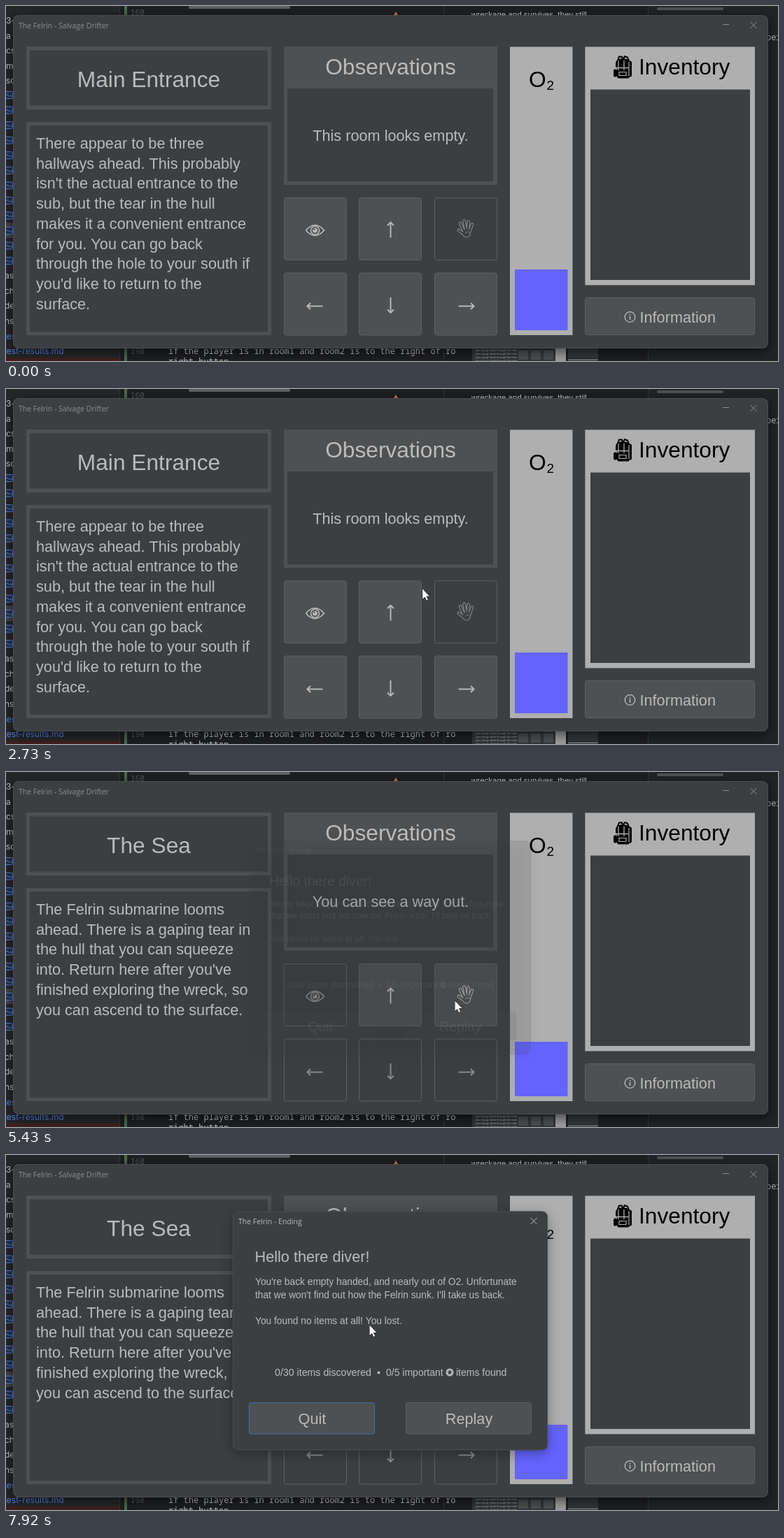
Write an HTML page with a canvas that moves like this. It is 1103 by 508 pixels and loops after 7.99 s.

```html
<!DOCTYPE html>
<html lang="en">
<head>
<meta charset="utf-8">
<title>Game window</title>
<style>
html, body { margin: 0; width: 100%; height: 100%; overflow: hidden; background: #1e1f22; }
canvas { display: block; }
</style>
</head>
<body>
<canvas id="stage" width="1103" height="508"></canvas>
<script>
const ctx = document.getElementById('stage').getContext('2d');
const LOOP = 7990;
const ACTIVATE = 3420, LEAVE = 3580, PRESS = 5230, DIALOG = 5410, DIALOG_DONE = 5730;
const BG = '#3c3f41', RAISED = '#4e5052', EDGE = '#5e6060', FOCUS = '#4272a8';
const TEXT = '#bbbbbb', DIM = '#8c8c8c', LIGHT = '#afafaf', BLUE = '#6464ff';
const SANS = '"Liberation Sans", Arial, sans-serif';
const UI = '"Open Sans", "Noto Sans", sans-serif';
const MONO = '"Noto Sans Mono", monospace';
const TREE = 'Inter, sans-serif';
const HEADING = 31.7, BODY = 21.7, SMALL = 13.75;

const rooms = {
  entrance: {
    name: 'Main Entrance',
    seen: 'This room looks empty.',
    oxygen: 377,
    off: ['hand'],
    lines: ['There appear to be three', 'hallways ahead. This probably',
      "isn't the actual entrance to the", 'sub, but the tear in the hull',
      'makes it a convenient entrance', 'for you. You can go back',
      'through the hole to your south if', "you'd like to return to the", 'surface.']
  },
  sea: {
    name: 'The Sea',
    seen: 'You can see a way out.',
    oxygen: 386,
    off: ['eye', 'left', 'down', 'right'],
    lines: ['The Felrin submarine looms', 'ahead. There is a gaping tear in',
      'the hull that you can squeeze', "into. Return here after you've",
      'finished exploring the wreck, so', 'you can ascend to the surface.']
  }
};

const buttons = [
  ['eye', 397, 274], ['up', 504, 274], ['hand', 612, 274],
  ['left', 397, 381.5], ['down', 504, 381.5], ['right', 612, 381.5]
];

// Pointer: time, x, y. Equal neighbours are rests.
const path = [
  [70, 993, 468], [162, 993, 468], [560, 880, 408], [970, 727, 338],
  [1180, 834, 215], [1380, 824, 60], [1470, 804, 25], [1586, 775, 78],
  [1720, 648, 240], [1790, 672, 315], [1900, 740, 334], [2000, 798, 270],
  [2130, 757, 200], [2392, 757, 200], [2530, 715, 193], [2740, 594, 286],
  [2950, 548, 375], [3210, 569, 420], [3902, 569, 420], [4300, 592, 370],
  [4690, 641, 327], [5932, 641, 327], [6300, 560, 305], [6690, 472, 267],
  [7102, 472, 267], [7400, 373, 290], [7650, 430, 295], [7920, 519, 243]
];

function slope(i, axis) {
  const a = path[i - 1], b = path[i], c = path[i + 1];
  if (!a || !c) return 0;
  const before = b[axis] - a[axis], after = c[axis] - b[axis];
  return before * after <= 0 ? 0 : (before + after) / (c[0] - a[0]);
}

function pointer(t) {
  if (t < 70) return null;
  const last = path.length - 1;
  if (t >= path[last][0]) return path[last].slice(1);
  const time = t < 214 ? t : 230 + 67.8 * Math.floor((t - 214) / 67.8);
  let i = 0;
  while (i < last - 1 && path[i + 1][0] <= time) i++;
  const a = path[i], b = path[i + 1], span = b[0] - a[0];
  const u = (time - a[0]) / span, v = 1 - u;
  return [1, 2].map(k =>
    v * v * (1 + 2 * u) * a[k] + u * u * (3 - 2 * u) * b[k] +
    span * u * v * (v * slope(i, k) - u * slope(i + 1, k)));
}

function rect(x, y, w, h, color) {
  ctx.fillStyle = color;
  ctx.fillRect(x, y, w, h);
}

function round(x, y, w, h, r, fill, stroke) {
  ctx.beginPath();
  ctx.roundRect(x, y, w, h, r);
  if (fill) { ctx.fillStyle = fill; ctx.fill(); }
  if (stroke) { ctx.strokeStyle = stroke; ctx.lineWidth = 1; ctx.stroke(); }
}

function text(str, x, y, size, color = TEXT, family = SANS, align = 'left') {
  ctx.font = `${size}px ${family}`;
  ctx.textAlign = align;
  ctx.fillStyle = color;
  ctx.fillText(str, x, y);
}

function centered(str, x, y, size) {
  text(str, x, y, size, TEXT, SANS, 'center');
}

function line(points, color, width = 1, close = false) {
  ctx.beginPath();
  points.forEach(([x, y]) => ctx.lineTo(x, y));
  if (close) ctx.closePath();
  ctx.strokeStyle = color;
  ctx.lineWidth = width;
  ctx.stroke();
}

function circle(x, y, r, fill, stroke, width = 1.3) {
  ctx.beginPath();
  ctx.arc(x, y, r, 0, 7);
  if (fill) { ctx.fillStyle = fill; ctx.fill(); }
  if (stroke) { ctx.strokeStyle = stroke; ctx.lineWidth = width; ctx.stroke(); }
}

function at(x, y, draw, angle = 0) {
  ctx.save();
  ctx.translate(x, y);
  ctx.rotate(angle);
  draw();
  ctx.restore();
}

function cross(x, y, color) {
  line([[x - 4.5, y - 4.5], [x + 4.5, y + 4.5]], color);
  line([[x - 4.5, y + 4.5], [x + 4.5, y - 4.5]], color);
}

function frameWindow(x, y, w, h, blur, shade) {
  ctx.save();
  ctx.shadowColor = `rgba(0,0,0,${shade})`;
  ctx.shadowBlur = blur;
  ctx.shadowOffsetY = blur / 4;
  round(x, y, w, h, 8, BG);
  ctx.restore();
  round(x + .5, y + .5, w - 1, h - 1, 8, null, '#4a4c4e');
}

function button(x, y, w, h, { off, hover, pressed, focus }) {
  const fill = off ? BG : pressed ? '#5c5f62' : hover ? '#55585a' : RAISED;
  const edge = !off && (hover || pressed || focus) ? FOCUS : EDGE;
  round(x + .5, y + .5, w - 1, h - 1, 3, fill, edge);
  return fill;
}

function desktop() {
  rect(0, 0, 1103, 508, '#1e1f22');
  rect(0, 0, 162, 508, '#25272a');
  rect(917, 0, 186, 508, '#222427');
  rect(162, 0, 1, 508, '#35373a');
  rect(917, 0, 1, 508, '#35373a');
  rect(0, 310, 162, 22, '#43454a');
  rect(0, 503, 162, 5, '#40201f');
  rect(169, 0, 4, 508, '#456f4a');
  round(261, 0, 145, 4, 2, '#606266');
  round(930, 2, 95, 4, 2, '#505256');

  ['3-p', 'a', 'cs', 'ma', 'sc'].forEach((w, i) =>
    text(w, 0, 25 + i * 21.5, 12, '#c8cace', TREE));
  ['as', 'ch', 'de', 'ns'].forEach((w, i) =>
    text(w, -2, 390 + i * 21.6, 12, '#c8cace', TREE));
  text('test', -3, 477, 12, '#548af7', TREE);
  text('test-results.md', -3, 498, 12, '#548af7', TREE);
  for (let i = 0; i < 12; i++) {
    const y = 127.5 + i * 21.55;
    round(-4.5, y - 5, 14, 10, 1, '#25324d', '#548af7');
    line([[-3, y + 4], [2, y - 1], [5, y + 2], [7, y], [9, y + 3]], '#548af7');
  }

  text('160', 178, 13, 11, '#555960', MONO);
  text('190', 178, 498, 11, '#555960', MONO);
  rect(625, 0, 1, 508, '#35373a');
  text('if the player is in room1 and room2 is to the right of ro', 232, 498, 12, '#bcbec4', MONO);
  text('right button.', 232, 513, 12, '#bcbec4', MONO);
  line([[553, 17], [557, 10], [561, 17]], '#d9822f', 2, true);
  text('wreckage and survives, they still', 665, 16, 11.5, '#d0d2d6', SANS);
  text('per', 1086, 49, 12, '#bcbec4', MONO);

  rect(666, 488, 134, 20, '#34373a');
  for (let i = 0; i < 4; i++) {
    text('you can go back through the hole', 671, 494 + i * 5, 4, '#b4b6b8');
  }
  [732, 750, 768].forEach(x => round(x, 493, 14, 13, 1, RAISED));
  rect(785, 488, 15, 20, '#a0a0a0');
  rect(803, 488, 43, 18, '#34373a');
  rect(803, 506, 43, 1, '#a0a0a0');
}

function eye(color, bg) {
  ctx.beginPath();
  ctx.moveTo(-13, 0);
  ctx.quadraticCurveTo(0, -15, 13, 0);
  ctx.quadraticCurveTo(0, 15, -13, 0);
  ctx.strokeStyle = color;
  ctx.lineWidth = 1.7;
  ctx.stroke();
  circle(0, 0, 6, null, color, 1.6);
  circle(0, 0, 3.4, color);
  circle(-1, -1.4, 1.2, bg);
}

function arrow(color) {
  line([[-11, 0], [11, 0]], color, 1.9);
  line([[6.5, -4.5], [11, 0], [6.5, 4.5]], color, 1.9);
}

function hand(color, bg) {
  const fingers = [[-3, 3, -8, -8], [0, 1, -2.5, -11.5], [3, 2, 3.5, -10.5],
    [5, 4, 9, -6.5], [-2, 8, -10, 2]];
  ctx.lineCap = 'round';
  for (const [shade, width, grow] of [[color, 4.6, 0], [bg, 2.5, -1]]) {
    for (const [x, y, tx, ty] of fingers) line([[x, y], [tx, ty]], shade, width);
    ctx.beginPath();
    ctx.ellipse(1, 6, 6 + grow, 6.5 + grow, 0, 0, 7);
    ctx.fillStyle = shade;
    ctx.fill();
  }
  line([[-1, 6], [2, 4], [5, 5]], color, .8);
}

function backpack() {
  ctx.lineCap = 'round';
  line([[-7, -10], [-5, -15], [-1, -15], [0, -11]], '#000', 2);
  line([[1, -12], [3, -15.5], [7, -14], [9, -9]], '#000', 2);
  round(-10, -12, 21, 13, [7, 8, 2, 2], '#000');
  round(-8, -1, 18, 17, 3, '#000');
  round(8, -9, 5, 23, 3, '#000');
  round(-13, 3, 5, 11, 2, '#000');
  line([[-9, 1], [8, 1]], LIGHT, 1.5);
  line([[-6, -9], [-6, 4]], LIGHT, 1.3);
  line([[2, -9], [2, 4]], LIGHT, 1.3);
  line([[-5, 7], [5, 7], [5, 12], [-5, 12]], LIGHT, 1.2, true);
  line([[9, -7], [9, 12]], LIGHT, 1.2);
}

const icons = {
  eye: [441.5, 321, eye], hand: [657, 319, hand],
  up: [549.5, 320.5, arrow, -Math.PI / 2], down: [549.5, 428, arrow, Math.PI / 2],
  left: [441.5, 429.5, arrow, Math.PI], right: [657.5, 429.5, arrow]
};

function mainWindow(t, mouse) {
  const room = t < LEAVE ? rooms.entrance : rooms.sea;
  const modal = t >= DIALOG, active = t >= ACTIVATE && !modal;
  const chrome = active ? '#c4c4c4' : '#8e8e8e';
  const over = (x, y, w, h) => !modal && t >= 200 && mouse &&
    mouse[0] >= x && mouse[0] < x + w - 1 && mouse[1] >= y && mouse[1] < y + h - 1;

  frameWindow(10, 13, 1079, 477, active ? 28 : 18, .6);
  text('The Felrin - Salvage Drifter', 18, 31.5, 10.5, chrome, UI);
  rect(1024, 26, 9, 1, chrome);
  cross(1068, 27.5, chrome);

  rect(29, 58, 350, 90, RAISED);
  rect(34, 63.5, 340, 79, BG);
  centered(room.name, 204, 116, HEADING);

  rect(29, 166, 350, 305, RAISED);
  rect(34, 171, 340, 295, BG);
  room.lines.forEach((s, i) => text(s, 43, 204 + i * 28.7, BODY));

  rect(397, 58, 305, 198, RAISED);
  rect(402, 118, 294, 133, BG);
  centered('Observations', 549.5, 98, HEADING);
  centered(room.seen, 549.5, 193, BODY);

  for (const [id, x, y] of buttons) {
    const off = room.off.includes(id);
    const pressed = (id === 'down' && t >= ACTIVATE && t < LEAVE) ||
      (id === 'hand' && t >= PRESS && !modal);
    const fill = button(x, y, 90, 90, { off, pressed, hover: over(x, y, 90, 90) });
    const [cx, cy, draw, angle] = icons[id];
    at(cx, cy, () => draw(off ? DIM : TEXT, fill), angle);
  }

  rect(720, 58.4, 89.5, 412.6, LIGHT);
  text('O', 747, 116, HEADING, '#000');
  text('2', 772.5, 120, 19, '#000');
  rect(727, room.oxygen, 75.5, 464 - room.oxygen, BLUE);

  rect(827.4, 58.4, 242.6, 341, LIGHT);
  rect(835, 119.5, 228, 272.5, BG);
  at(881, 87.5, backpack);
  text('Inventory', 904, 98, HEADING, '#000');

  button(827, 417, 243, 54, {
    hover: over(827, 417, 243, 54),
    focus: t >= LEAVE && t < PRESS
  });
  circle(891.5, 445, 7.3, null, TEXT);
  rect(890.8, 443.5, 1.5, 5.5, TEXT);
  rect(890.8, 440.7, 1.5, 1.5, TEXT);
  text('Information', 905.5, 452.5, BODY);
}

function star(x, y) {
  circle(x, y, 5.5, TEXT);
  ctx.beginPath();
  for (let i = 0; i < 10; i++) {
    const r = i % 2 ? 1.7 : 4.2, a = i * Math.PI / 5 - Math.PI / 2;
    ctx.lineTo(x + r * Math.cos(a), y + r * Math.sin(a));
  }
  ctx.fillStyle = BG;
  ctx.fill();
}

function dialog(t) {
  const p = Math.min(1, (t - DIALOG) / (DIALOG_DONE - DIALOG));
  const scale = 1 - .122 * (1 - p) ** 2;
  ctx.save();
  ctx.globalAlpha = Math.min(1, p * 1.8);
  ctx.translate(547.5, 250.5);
  ctx.scale(scale, scale);
  ctx.translate(-547.5, -250.5);
  frameWindow(324, 80.5, 450, 342, 18, .35);
  text('The Felrin - Ending', 332, 98.5, 10.5, TEXT, UI);
  cross(754, 94.5, TEXT);
  text('Hello there diver!', 355.5, 152.5, BODY);
  text("You're back empty handed, and nearly out of O2. Unfortunate", 356, 186, SMALL);
  text("that we won't find out how the Felrin sunk. I'll take us back.", 356, 205, SMALL);
  text('You found no items at all! You lost.', 356, 242, SMALL);
  text('0/30 items discovered', 384, 316, 14.2);
  circle(532.5, 311.5, 2, TEXT);
  text('0/5 important', 543, 316, 14);
  star(634, 311);
  text('items found', 643, 316, 14);
  button(347, 354, 180, 45.5, { focus: true });
  button(571, 354, 180, 45.5, {});
  centered('Quit', 437.5, 385, BODY);
  centered('Replay', 661.5, 385, BODY);
  ctx.restore();
}

function drawPointer([x, y]) {
  at(x, y, () => {
    line([[.5, .5], [.5, 15], [3.8, 12], [6.2, 17], [8.3, 16], [6, 11.2], [10.5, 11]],
      '#000', 1, true);
    ctx.fillStyle = '#fff';
    ctx.fill();
  });
}

function draw(now) {
  const t = now % LOOP;
  const mouse = pointer(t);
  desktop();
  mainWindow(t, mouse);
  if (t >= DIALOG) dialog(t);
  if (mouse) drawPointer(mouse);
  requestAnimationFrame(draw);
}
requestAnimationFrame(draw);
</script>
</body>
</html>
```
